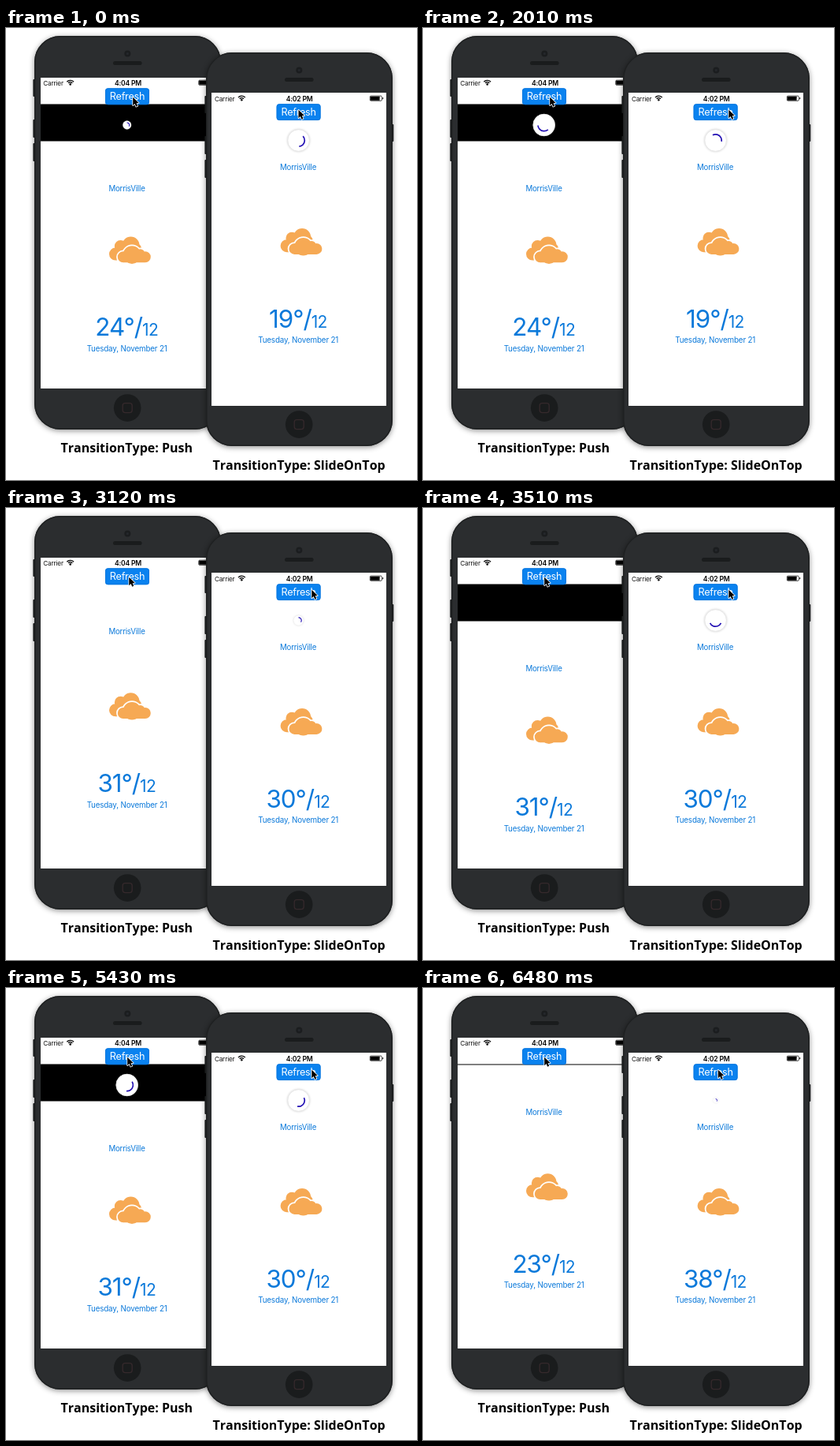
An HTML page with a canvas that plays this animation: 522 by 573 pixels, repeating every 6.51 s.

```html
<!DOCTYPE html>
<html lang="en">
<head>
<meta charset="utf-8">
<title>Pull to refresh transitions</title>
<style>
  html, body { margin: 0; width: 100%; height: 100%; overflow: hidden; background: #fff; }
  canvas { display: block; }
</style>
</head>
<body>
<canvas id="stage" width="522" height="573"></canvas>
<script>
const ctx = document.getElementById('stage').getContext('2d');
const LOOP = 6510;
const BLUE = '#0b79da';
const SANS = 'Inter, Roboto, sans-serif';
const PANEL_TOP = 96.6;
const PANEL = 46.8;

// Progress of t between a and b, limited to 0..1
const ramp = (t, a, b) => Math.min(1, Math.max(0, (t - a) / (b - a)));
const smooth = p => p * p * (3 - 2 * p);
const mix = (a, b, p) => a + (b - a) * p;

function box(x, y, w, h, r, fill) {
  ctx.beginPath();
  ctx.roundRect(x, y, w, h, r);
  ctx.fillStyle = fill;
  ctx.fill();
}

function disc(x, y, r, fill) {
  ctx.beginPath();
  ctx.arc(x, y, r, 0, Math.PI * 2);
  ctx.fillStyle = fill;
  ctx.fill();
}

function label(str, x, y, size, color, align = 'center', weight = 400, track = -0.022) {
  ctx.font = `${weight} ${size}px ${SANS}`;
  ctx.letterSpacing = `${size * track}px`;
  ctx.textAlign = align;
  ctx.fillStyle = color;
  ctx.fillText(str, x, y);
  const w = ctx.measureText(str).width;
  ctx.letterSpacing = '0px';
  return w;
}

function caption(str, x, y) {
  ctx.font = '700 16px "Open Sans", "Noto Sans", sans-serif';
  ctx.fontKerning = 'none';
  ctx.textAlign = 'left';
  ctx.fillStyle = '#000';
  ctx.fillText(str, x, y);
  ctx.fontKerning = 'auto';
}

function drawBody(x, y) {
  ctx.save();
  ctx.translate(x, y);
  for (const [by, bh] of [[55, 22], [106, 23], [136, 23]]) box(-1.6, by, 4, bh, 1, '#1f2122');
  box(235, 91, 3.3, 22, 1, '#1f2122');
  ctx.shadowColor = 'rgba(0,0,0,.45)';
  ctx.shadowBlur = 7;
  ctx.shadowOffsetY = 1.5;
  box(0, 0, 237, 499, 33, '#2b2d2f');
  ctx.shadowColor = 'transparent';
  ctx.beginPath();
  ctx.roundRect(0.75, 0.75, 235.5, 497.5, 32.2);
  ctx.strokeStyle = '#1e2021';
  ctx.lineWidth = 1.5;
  ctx.stroke();
  disc(118.3, 22.5, 4, '#1b1d1f');
  disc(118.3, 22.5, 1.6, '#25282c');
  box(100, 32, 36.6, 5, 2.5, '#1a1c1d');
  disc(118.2, 471.6, 17.3, '#1a1c1d');
  ctx.beginPath();
  ctx.roundRect(112.2, 465.6, 12, 12, 3);
  ctx.strokeStyle = '#35292c';
  ctx.lineWidth = 1.3;
  ctx.stroke();
  ctx.restore();
}

function drawStatus(time) {
  label('Carrier', 47.3, 72.7, 8.2, '#111', 'left');
  label(time, 155, 72.7, 8.6, '#000', 'center', 600);
  ctx.strokeStyle = '#000';
  ctx.lineWidth = 1.3;
  for (const r of [3.6, 6]) {
    ctx.beginPath();
    ctx.arc(81.7, 72.3, r, -Math.PI * 0.76, -Math.PI * 0.24);
    ctx.stroke();
  }
  disc(81.7, 71.4, 1.3, '#000');
  ctx.beginPath();
  ctx.roundRect(244.7, 66.2, 15, 6.2, 1.2);
  ctx.lineWidth = 0.7;
  ctx.stroke();
  box(245.2, 66.8, 11.8, 5, 0.5, '#000');
  box(260.6, 68.2, 1, 2.2, 0.4, '#000');
}

function cloudShape(circles, base) {
  ctx.beginPath();
  for (const [x, y, r] of circles) {
    ctx.moveTo(x + r, y);
    ctx.arc(x, y, r, 0, Math.PI * 2);
  }
  ctx.rect(...base);
}

function drawCloud(x, y) {
  ctx.save();
  ctx.translate(x, y);
  ctx.fillStyle = '#f6a954';
  cloudShape([[8, 22.3, 8], [14.5, 12.5, 7.7], [27.5, 11.2, 11], [34.5, 15, 6.3]], [8, 13, 24, 17.3]);
  ctx.fill();
  cloudShape([[17.8, 26, 7], [29, 23.3, 11.3], [39.5, 22, 6], [45.8, 26, 7]], [17.8, 23, 28, 10]);
  ctx.strokeStyle = '#fff';
  ctx.lineWidth = 3.4;
  ctx.stroke();
  ctx.fill();
  ctx.restore();
}

function drawTemp(value, cx, y) {
  const big = value + '°/', small = '12';
  const bigSize = 31.4, smallSize = 21, track = -0.033;
  const width = (str, size) => {
    ctx.font = `400 ${size}px ${SANS}`;
    ctx.letterSpacing = `${size * track}px`;
    return ctx.measureText(str).width;
  };
  const x = cx - (width(big, bigSize) + width(small, smallSize)) / 2;
  const w = label(big, x, y, bigSize, BLUE, 'left', 400, track);
  label(small, x + w, y, smallSize, BLUE, 'left', 400, track);
}

function drawSpinner(x, y, scale, degrees, ring) {
  if (scale <= 0) return;
  ctx.save();
  ctx.translate(x, y);
  if (ring) {
    ctx.shadowColor = `rgba(0,0,0,${0.22 * scale})`;
    ctx.shadowBlur = 3;
  }
  disc(0, 0, 14 * scale, '#fff');
  ctx.shadowColor = 'transparent';
  ctx.beginPath();
  ctx.arc(0, 0, 13.8 * scale, 0, Math.PI * 2);
  ctx.strokeStyle = `rgba(225,225,225,${scale})`;
  ctx.lineWidth = 0.8;
  ctx.stroke();
  const mid = degrees * Math.PI / 180, half = 1.12;
  ctx.beginPath();
  ctx.arc(0, 0, 7.7 * scale, mid - half, mid + half);
  ctx.strokeStyle = '#2412b4';
  ctx.lineWidth = 1.7 * Math.sqrt(scale);
  ctx.stroke();
  ctx.restore();
}

function drawCursor(x, y) {
  ctx.beginPath();
  [[0, 0], [0, 10.5], [2.4, 8.3], [4, 12], [6, 11.1], [4.4, 7.5], [7.5, 7.3]]
    .forEach(([px, py]) => ctx.lineTo(x + px, y + py));
  ctx.closePath();
  ctx.lineJoin = 'round';
  ctx.strokeStyle = '#fff';
  ctx.lineWidth = 1.6;
  ctx.stroke();
  ctx.fillStyle = '#000';
  ctx.fill();
}

function drawButton() {
  box(126, 76.3, 56, 20.9, 3.5, '#0a82ef');
  ctx.beginPath();
  ctx.roundRect(126.5, 76.8, 55, 19.9, 3.2);
  ctx.strokeStyle = '#0a74da';
  ctx.lineWidth = 0.8;
  ctx.stroke();
  label('Refresh', 154, 91.2, 12.7, '#fff');
}

function drawWeather(value, cityShift, bodyShift) {
  label('MorrisVille', 153.5, 160.2 + cityShift, 9.7, BLUE);
  drawCloud(131, 234 + bodyShift);
  drawTemp(value, 153.2, 359.7 + bodyShift);
  label('Tuesday, November 21', 153.6, 379.5 + bodyShift, 9.8, BLUE, 'center', 400, -0.016);
}

// Each run grows, spins at a fixed rate (deg/ms) and shrinks; "mid" is the arc's angle at "ref"
const pushRuns = [
  { grow: [-130, 210], shrink: [2390, 2600], ref: 1230, mid: 90, rate: 0.49, from: 250 },
  { grow: [3515, 3825], shrink: [5990, 6200], ref: 4650, mid: -15, rate: 0.52, from: 3850 }
];
const slideRuns = [
  { grow: [-600, -300], shrink: [2100, 2300], ref: 0, mid: 20, rate: 0.5, from: -300 },
  { grow: [2980, 3280], shrink: [5550, 5760], ref: 3510, mid: 90, rate: 0.535, from: 3290 },
  { grow: [6400, 6720], shrink: [9000, 9200], ref: 6720, mid: -25, rate: 0.5, from: 6720 }
];

function spin(runs, t, x, y, ring) {
  for (const r of runs) {
    const scale = ramp(t, ...r.grow) - ramp(t, ...r.shrink);
    const at = Math.min(r.shrink[0], Math.max(r.from, t));
    drawSpinner(x, y, scale, r.mid + r.rate * (at - r.ref), ring);
  }
}

// City offset and lower content offset; the lower part is squeezed while the panel is open
function pushState(t) {
  const close = start => {
    const d = PANEL * (1 - ramp(t, start, start + 287));
    return [d, d];
  };
  if (t < 2615) return [PANEL, 30.3];
  if (t < 3260) return close(2615);
  if (t < 6200) {
    const p = ramp(t, 3260, 3495);
    return [PANEL * p, 30.3 * p];
  }
  return close(6200);
}

function drawPush(t) {
  drawBody(36, 10);
  ctx.save();
  ctx.beginPath();
  ctx.rect(44, 63, 222, 394);
  ctx.clip();
  box(44, 63, 222, 394, 0, '#fff');
  drawStatus('4:04 PM');
  const [city, body] = pushState(t);
  if (city > 0) box(44, PANEL_TOP, 222, city, 0, '#000');
  drawWeather(t < 2390 ? 24 : t < 5990 ? 31 : 23, city - 0.5, body);
  spin(pushRuns, t, 153.7, 123, false);
  drawButton();
  drawCursor(mix(161.2, 154.2, smooth(ramp(t, 2980, 3200))), 87.7);
  ctx.restore();
}

function drawSlide(t) {
  drawBody(254, 31);
  box(261, 82, 222, 397, 0, '#fff');
  ctx.save();
  ctx.translate(217.6, 19.9);
  drawStatus('4:02 PM');
  drawWeather(t < 2100 ? 19 : t < 5550 ? 30 : 38, -0.5, 0);
  spin(slideRuns, t, 154, 122.6, true);
  drawButton();
  ctx.restore();
  const away = smooth(ramp(t, 150, 450));
  const back = smooth(ramp(t, 6230, 6440));
  drawCursor(mix(mix(371.5, 388.3, away), 374.8, back), 103.8);
}

function draw(now) {
  const t = now % LOOP;
  ctx.fillStyle = '#fff';
  ctx.fillRect(0, 0, 522, 573);
  drawPush(t);
  drawSlide(t);
  caption('TransitionType: Push', 69.5, 538);
  caption('TransitionType: SlideOnTop', 262.5, 560);
}

const begin = performance.now();
function tick(now) {
  draw(Math.max(0, now - begin));
  requestAnimationFrame(tick);
}
draw(0);
requestAnimationFrame(tick);
</script>
</body>
</html>
```
